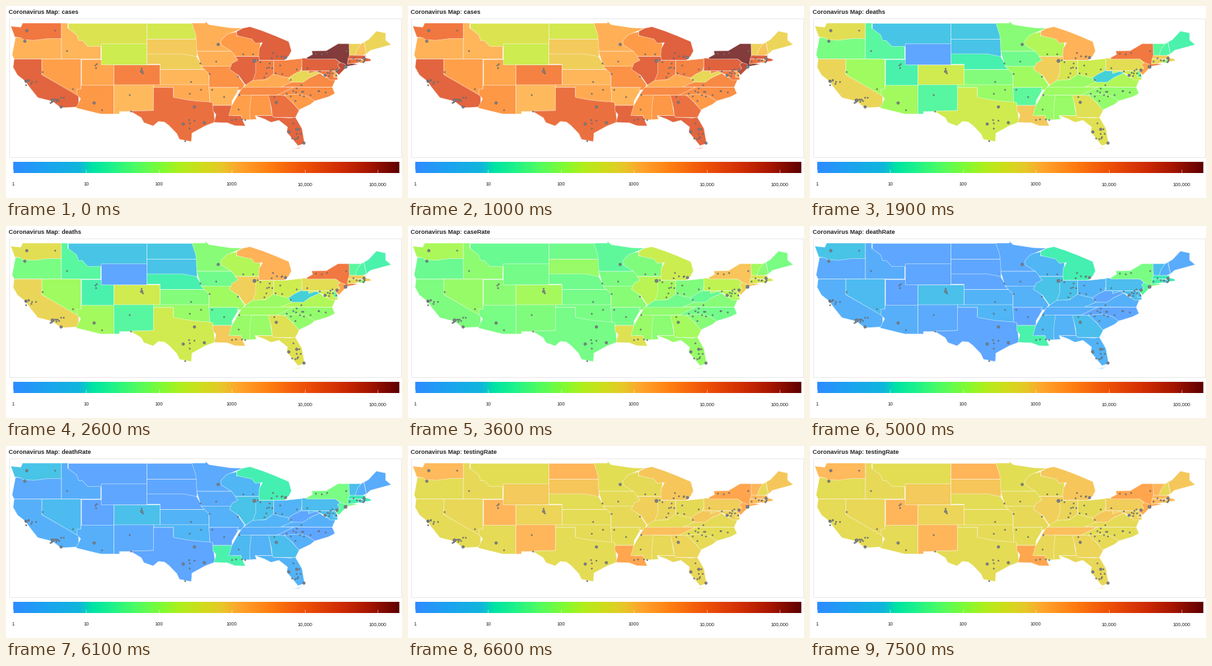
Write a matplotlib script that moves like this. It is 600 by 292 pixels and loops after 7.6 s.

```python
import matplotlib.pyplot as plt
import numpy as np
from matplotlib.animation import FuncAnimation
from matplotlib.collections import PolyCollection
from matplotlib.colors import LinearSegmentedColormap

W, H, DPI = 600, 292, 100
PX = 72 / DPI
BAR_X, BAR_END, DECADE = 11, 595.5, 110.4
TOP = (BAR_END - BAR_X) / DECADE  # log10 of the last bar value
ALPHA = 0.77
INK = "#262626"

STOPS = [(0, "#2e8cff"), (0.4, "#1ca0f2"), (0.9, "#10b6dc"), (1.08, "#00e4a4"),
         (1.35, "#1cf28c"), (1.7, "#50fc60"), (2.06, "#84fa30"), (2.3, "#b0ee1c"),
         (2.6, "#d0dc1c"), (2.85, "#e6c828"), (3.1, "#ffa42c"), (3.5, "#ff8012"),
         (4, "#ee5008"), (4.5, "#d02c04"), (4.9, "#a41400"), (TOP, "#5e0000")]
CMAP = LinearSegmentedColormap.from_list("heat", [(v / TOP, c) for v, c in STOPS], 512)

MODES = ["cases", "deaths", "caseRate", "deathRate", "testingRate"]
SWITCH = [16, 31, 47, 62]

shapes, stats = [], []


def state(people, cases, deaths, *outline, testing=1):
    """People in millions; outline as west longitude, latitude pairs.

    Two points make a box. Later states cover earlier ones, so each
    shared border is exact only in the state drawn last.
    """
    p = np.reshape(outline, (-1, 2))
    if len(p) == 2:
        (w, n), (e, s) = p
        p = np.array([(w, n), (e, n), (e, s), (w, s)])
    shapes.append(np.column_stack([7 + 9.98 * (124.73 - p[:, 0]),
                                   26 + 7.82 * (49 - p[:, 1])]))
    rate = cases / people / 10  # per 100,000 people
    stats.append([cases, deaths, rate, deaths / people / 10, (450 + 2 * rate) * testing])


# West
state(1.07, 394, 7, 116.05, 49, 104.05, 44.4)
state(1.8, 1430, 27, 117.03, 49, 116.05, 49, 116.05, 48, 114.7, 46.7, 114.4, 45.6, 113.9, 45.65,
      113, 44.45, 111.05, 44.5, 111.05, 42, 117.03, 42)
state(4.2, 1580, 53, 124, 46.2, 117.03, 46.2, 117.03, 42, 124.2, 42, 124.5, 42.8)
state(7.6, 10400, 508, 124.7, 48.4, 123.2, 48.2, 122.9, 49, 117.03, 49, 117.03, 46, 119, 46,
      121.2, 45.65, 122.8, 45.8, 123.2, 46.15, 124.1, 46.3, testing=1.7)
state(39.5, 22300, 687, 124.2, 42, 120, 42, 120, 39, 114.4, 35, 114.4, 32.7, 117.1, 32.53,
      118.4, 33.8, 120.6, 34.5, 121.9, 36.6, 122.5, 37.7, 123.7, 38.9, 124.35, 40.4)
state(3.1, 2970, 114, 120, 42, 114.04, 42, 114.04, 35, 114.63, 35, 120, 39)
state(7.3, 3700, 122, 114.04, 37, 109.05, 37, 109.05, 31.33, 111.07, 31.33, 114.8, 32.5,
      114.1, 34.3, 114.63, 35, 114.7, 36.1, 114.04, 36.2)
state(3.2, 2360, 18, 114.04, 42, 109.05, 37, testing=2.3)
state(5.8, 7300, 289, 109.05, 41, 102.05, 37)
state(2.1, 1250, 26, 109.05, 37, 103, 37, 103, 32, 106.6, 31.8, 108.2, 31.8, 108.2, 31.33,
      109.05, 31.33, testing=2.4)
# Plains
state(0.76, 331, 8, 104.05, 49, 96.55, 45.94, testing=2.7)
state(0.88, 868, 6, 104.05, 45.94, 96.45, 42.5, testing=1.5)
state(1.9, 814, 17, 104.05, 43, 98.5, 43, 96.5, 42.5, 95.3, 40, 102.05, 40, 102.05, 41, 104.05, 41)
state(0.58, 270, 1, 111.05, 45, 104.05, 41, testing=1.6)
state(2.9, 1380, 62, 102.05, 40, 94.62, 37)
state(29, 13900, 287, 103.04, 36.5, 100, 36.5, 100, 34.7, 94.04, 33.7, 93.7, 29.75, 95.2, 29,
      97.2, 27.6, 97.3, 25.95, 99.1, 26.4, 99.5, 27.5, 100.7, 29.1, 101.4, 29.77, 102.3, 29.87,
      103.1, 29, 104.5, 29.65, 104.9, 30.6, 106.6, 31.9, 103.06, 32)
state(4, 2070, 99, 103, 37, 94.62, 37, 94.45, 33.65, 96.6, 33.85, 98.1, 34.1, 100, 34.56,
      100, 36.5, 103, 36.5)
# Midwest and lower river
state(3, 1410, 29, 94.62, 36.5, 89.9, 36.5, 91.1, 33.9, 91.15, 33, 94.04, 33, 94.04, 33.5, 94.48, 33.65)
state(4.65, 21000, 884, 94.04, 33, 91, 33, 91, 31, 89.73, 31, 89.4, 29.8, 89.1, 29, 90.7, 29.05,
      91.8, 29.6, 93.85, 29.7, 93.55, 31.2, 94.04, 32, testing=1.7)
state(5.8, 3430, 154, 92, 46.9, 90.4, 47.3, 90.4, 46.5, 87, 46.5, 86.8, 45.2, 87, 42.5,
      91, 42.5, 93, 44.75, 93, 46)
state(5.6, 1650, 70, 97.2, 49, 95.15, 49, 95.15, 49.38, 94.6, 48.7, 91.5, 48.1, 89.5, 48,
      92, 46.7, 92.8, 45.6, 92.75, 44.75, 91.2, 43.5, 96.45, 43.5, 96.6, 46.6)
state(10, 25600, 1602, 90.4, 46.57, 90.4, 47.4, 89.5, 48, 88.4, 48.3, 86.5, 47.5, 84.5, 46.5,
      82.5, 45.4, 82.1, 43.6, 82.5, 42.6, 83.2, 41.75, 87.1, 41.75, 87, 44, 86.5, 45.2,
      87.6, 45.1, 88.1, 45.9)
state(3.2, 1710, 43, 96.5, 43.5, 91.2, 43.5, 90, 41.6, 91, 40.4, 95.8, 40.6)
state(6.1, 4390, 114, 95.8, 40.6, 91.2, 40.6, 89.2, 37, 89.6, 36, 90.4, 36, 90.1, 36.5,
      94.62, 36.5, 94.6, 39.1)
state(12.7, 22000, 794, 90.65, 42.5, 87, 42.5, 87.3, 37.2, 89.1, 36.98, 90.1, 38.8, 91.5, 40,
      91.1, 41.2, 90.2, 41.8)
state(6.7, 8240, 350, 87.53, 41.75, 84.8, 41.75, 84.8, 38.2, 88, 37.7, 87.53, 39.3)
state(11.7, 6980, 274, 84.8, 41.75, 83.2, 41.75, 80.52, 42.1, 80.52, 40, 82, 38, 84.8, 38.5)
# South
state(4.5, 1960, 104, 89.1, 36.9, 88, 37.85, 86, 38, 84.8, 39.1, 83.7, 38.65, 82.6, 38.4,
      81.9, 37.4, 83, 36.3, 89.5, 36.3)
state(3, 2940, 98, 91.6, 31, 91.15, 33, 90.2, 35.1, 88.1, 35.1, 88.4, 30.2, 89.6, 30.2, 89.73, 31)
state(4.9, 3730, 99, 88.2, 35, 85.5, 35, 85, 31, 87.6, 31, 87.4, 30.3, 88.4, 30.2, 88.45, 31.9)
state(10.6, 13300, 464, 85.6, 35, 83, 35, 80.9, 32.1, 81.5, 30.6, 85, 30.7, 85.1, 32.3)
state(6.8, 5610, 109, 90.3, 35, 84, 35, 81.7, 36.58, 89.5, 36.5, testing=1.8)
state(21.5, 20600, 470, 87.6, 31, 85, 31, 84.86, 30.7, 82.2, 30.55, 81.5, 30.7, 80.5, 28.5,
      80.1, 25.6, 81.1, 25.15, 82.8, 27.8, 82.7, 28.8, 84, 30.1, 85.2, 29.7, 86.2, 30.35)
state(21.5, 20600, 470, 82, 24.6, 81, 24.75, 80.5, 25, 81, 24.6)
state(10.5, 4820, 86, 84.3, 35, 81.7, 36.58, 75.9, 36.55, 75.5, 35.3, 76.5, 34.65, 78.55, 33.86, 83, 34.9)
state(5.15, 3440, 87, 83.2, 35, 81, 35.2, 79.7, 34.8, 78.55, 33.86, 79.2, 33.2, 81, 32.1, 81.9, 33.5)
state(8.5, 5750, 149, 83.7, 36.6, 75.9, 36.55, 75.4, 38, 77, 38.5, 77.8, 39.3, 80, 38, 82, 37.5)
state(6, 8940, 262, 79.48, 39.72, 75.4, 39.72, 75.05, 38, 76.2, 37.9, 77.1, 38.9, 77.75, 39.3, 79.48, 39.2)
state(0.97, 1625, 41, 75.79, 39.8, 75.4, 39.8, 75.05, 38.45, 75.7, 38.46)
state(1.8, 626, 9, 82.6, 38.3, 81.7, 39.1, 80.7, 39.7, 80.52, 40.6, 80.52, 39.72, 79.48, 39.72,
      79.48, 39.2, 78.4, 39.6, 77.75, 39.3, 79.3, 38.4, 80.3, 37.5, 82, 37.5, testing=1.8)
# Northeast
state(12.8, 24200, 524, 80.52, 42.2, 75.35, 42.05, 74.7, 41.35, 74.7, 40, 75.45, 39.72, 80.52, 39.72)
state(19.45, 195000, 10056, 79.76, 42, 79.76, 42.3, 78.9, 42.9, 79, 43.6, 76.8, 43.63, 75, 45,
      73.3, 45, 73.3, 41.2, 71.9, 41, 74.1, 40.5, 74.7, 41.35, 75.35, 42)
state(8.9, 64600, 2443, 74.7, 41.35, 73.9, 41, 74, 40.1, 74.9, 38.9, 75.5, 39.6, 74.75, 40.2, 75.1, 40.9)
state(3.6, 13400, 602, 73.5, 42.05, 71.8, 42.02, 71.85, 41.3, 73.6, 41)
state(0.62, 748, 28, 73.35, 45, 71.5, 45, 72.4, 42.7, 73.3, 42.7, testing=2)
state(1.36, 985, 23, 71.5, 45, 71.1, 45.3, 70.7, 43, 71.3, 42.7, 72.45, 42.7, 72.05, 44.1)
state(6.95, 26900, 844, 73.26, 42.74, 70.7, 42.7, 71, 42.3, 70.1, 42, 70, 41.65, 71.1, 41.5,
      71.4, 42.02, 73.5, 42.05)
state(1.06, 2980, 73, 71.85, 42.02, 71.2, 41.35)
state(1.34, 698, 19, 71.08, 45.3, 70.4, 45.8, 69.2, 47.45, 67.8, 47.07, 67.8, 45.7, 66.95, 44.8,
      70.1, 43.7, 70.7, 43, testing=1.7)

levels = np.log10(np.maximum(stats, 1)) / TOP
fills = CMAP(levels)[..., :3] * ALPHA + 1 - ALPHA  # state, mode, rgb

fig = plt.figure(figsize=(W / DPI, H / DPI), dpi=DPI, facecolor="white")
ax = fig.add_axes([0, 0, 1, 1])
ax.axis("off")
ax.add_patch(plt.Rectangle((4.5, 18.5), 594, 211, fill=False, ec="#e8e8e8", lw=PX))

land = PolyCollection(shapes, facecolors=fills[:, 0], edgecolors="#ffffffa0",
                      linewidths=0.7 * PX, joinstyle="round", zorder=2)
ax.add_collection(land)


def dots(r, xy):
    x, y = np.reshape(xy, (-1, 2)).T
    ax.scatter(x, y, s=(2 * r * PX) ** 2, c="#7e8086",
               edgecolors="#5c6068", linewidths=0.6 * PX, zorder=3)


# Big cities, then lone towns
dots(2.5, [70, 142.5, 376, 82.5, 514, 91.5])
dots(1.9, [133, 147, 285, 153, 300, 177, 409, 146, 501, 97, 483, 105, 451, 208, 31, 37, 28, 53,
           30, 114, 83, 152.5, 205, 98.5, 321, 58, 268, 179, 423, 78, 542, 79, 428, 191, 440, 187])
dots(0.9, [74, 37, 92, 68, 55, 100, 101, 126, 145, 158, 189, 160, 187, 135, 280, 115, 278, 133,
           295, 127, 312, 127, 294, 87, 308, 103, 318, 84, 330, 138, 351, 107, 359, 73, 374, 73,
           353, 135, 352, 157, 271, 205, 515, 68])

# Clusters of towns: centre, spread, count
rng = np.random.default_rng(4)
for x, y, dx, dy, n in [(37, 113, 5, 3, 8), (78, 144, 6, 2.5, 9), (136, 91, 1, 3, 3),
                        (206, 98, 1, 5, 2), (279, 180, 3, 12, 4), (362, 172, 15, 1, 4),
                        (410, 75, 8, 3, 5), (415, 95, 20, 7, 14), (437, 130, 22, 6, 16),
                        (440, 194, 6, 6, 8), (478, 72, 10, 1, 3), (490, 103, 5, 9, 8),
                        (530, 82, 8, 3, 8)]:
    dots(0.9, rng.normal((x, y), (dx, dy), (n, 2)))

ax.imshow(np.linspace(0, 1, 585)[None], cmap=CMAP, aspect="auto",
          extent=(BAR_X, BAR_END, 254, 237))
for i, label in enumerate(["1", "10", "100", "1000", "10,000", "100,000"]):
    x = BAR_X + DECADE * i
    ax.plot([x, x], [249, 254], color="white", lw=0.5 * PX)
    ax.text(x, 272.8, label, ha="center", va="baseline", family="Liberation Sans",
            size=7.6 * PX, color=INK)

title = ax.text(4, 12.5, "", va="baseline", family="Liberation Sans", weight="bold",
                size=9.2 * PX, color=INK)
ax.set(xlim=(0, W), ylim=(H, 0))


def update(frame):
    mode = sum(frame >= s for s in SWITCH)
    land.set_facecolor(fills[:, mode])
    title.set_text("Coronavirus Map: " + MODES[mode])
    return land, title


anim = FuncAnimation(fig, update, frames=76, interval=100, repeat=True, repeat_delay=0)
plt.show()
```
